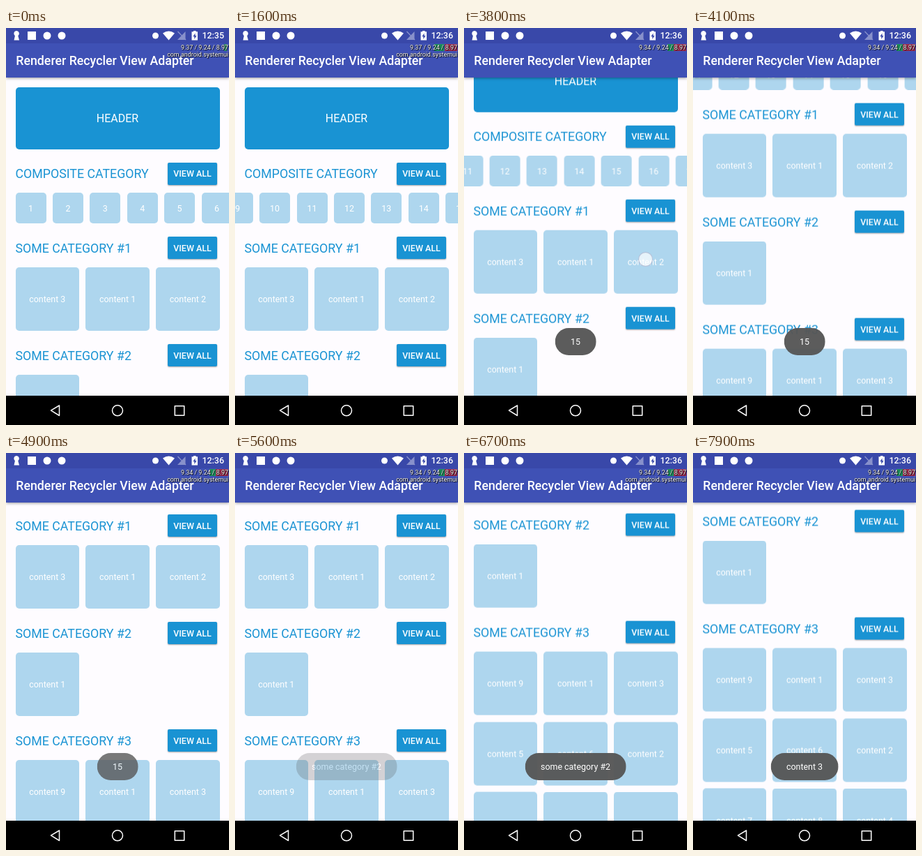
Recreate the animation shown at these times as an HTML page. Size 320 by 569 pixels, loop 8000 ms.

```html
<!DOCTYPE html>
<html lang="en">
<head>
<meta charset="utf-8">
<title>Renderer Recycler View Adapter</title>
<style>
  html, body { margin: 0; width: 100%; height: 100%; overflow: hidden; background: #fefcff; }
  body { position: relative; font: 12.44px Roboto, sans-serif; color: #fff; }
  #stage { position: absolute; left: 0; top: 0; width: 320px; height: 569px; overflow: hidden; }
  #stage div { position: absolute; white-space: nowrap; }
  #stage svg { position: absolute; left: 0; }

  .box { display: flex; align-items: center; justify-content: center; border-radius: 5px; }
  .header { left: 13.5px; top: 85px; width: 293px; height: 88.5px; background: #1993d3; font-size: 16px; }
  .title { left: 13.5px; line-height: 24px; font-size: 17.78px; color: #1993d3; }
  .button { left: 232px; width: 71px; height: 32px; border-radius: 2px; background: #1993d3;
    font-weight: 500; box-shadow: 0 1px 2px rgba(0, 0, 0, .35); }
  .tile { width: 91.5px; height: 91.5px; background: #aed6ee; }
  .chip { top: 236px; width: 44px; height: 44px; background: #aed6ee; }

  #bar { left: 0; top: 0; width: 320px; height: 71px; background: #3f51b5; box-shadow: 0 1px 4px rgba(0, 0, 0, .4); }
  #status { left: 0; top: 0; width: 320px; height: 21.5px; background: #3948a9; }
  #name { left: 14.3px; top: 35px; line-height: 24px; font-size: 17.78px; font-weight: 500; }
  .clock { right: 7px; top: 3px; line-height: 16px; font-weight: 500; }
  .load { right: 1px; font-size: 8.89px; line-height: 11px; text-shadow: 1px 1px 1px #000, 0 0 1px #000; }
  .meter { top: 23px; height: 10px; }
  #nav { left: 0; top: 526.5px; width: 320px; height: 42.5px; background: #000; }

  .toast { left: 160px; top: 430px; height: 39px; padding: 0 22.3px; border-radius: 20px;
    background: rgba(86, 86, 86, .96); line-height: 40px; transform: translateX(-50%); opacity: 0; }
  #touch { left: -10.5px; top: -10.5px; width: 19px; height: 19px; border: 1px solid rgba(130, 135, 175, .5);
    border-radius: 50%; background: rgba(255, 255, 255, .7); opacity: 0; }

  /* 1% = 80 ms */
  #list { animation: scroll 8s linear infinite; }
  @keyframes scroll {
    0%, 45% { transform: translateY(0); animation-timing-function: cubic-bezier(.33, 0, .67, .33); }
    47.5% { transform: translateY(-52.5px); animation-timing-function: cubic-bezier(.333, 1, .667, 1); }
    55%, 77.5% { transform: translateY(-211px); animation-timing-function: ease-in; }
    78.75% { transform: translateY(-231.5px); animation-timing-function: cubic-bezier(.333, 1, .667, 1); }
    86.25%, 100% { transform: translateY(-371.5px); }
  }
  #chips { animation: slide 8s linear infinite; }
  @keyframes slide {
    0%, 13.75% { transform: translateX(0); animation-timing-function: ease-in; }
    16.25% { transform: translateX(-130px); animation-timing-function: cubic-bezier(.333, 1, .667, 1); }
    26.25%, 100% { transform: translateX(-564.4px); }
  }
  #touch { animation: move 8s linear infinite, tap 8s step-end infinite; }
  @keyframes move {
    0%, 13.75% { transform: translate(262px, 258px); animation-timing-function: ease-in; }
    16.25%, 17.4% { transform: translate(125px, 258px); animation-timing-function: step-end; }
    32.5%, 36% { transform: translate(218px, 258px); animation-timing-function: step-end; }
    44.9%, 45% { transform: translate(258px, 384px); animation-timing-function: ease-in; }
    47.5% { transform: translate(260px, 331.5px); }
    48.75% { transform: translate(262px, 285px); animation-timing-function: step-end; }
    65%, 68% { transform: translate(267px, 258px); animation-timing-function: step-end; }
    77%, 77.5% { transform: translate(270px, 338px); animation-timing-function: ease-in; }
    78.75% { transform: translate(271px, 317.5px); }
    80% { transform: translate(272px, 275px); animation-timing-function: step-end; }
    91.25%, 100% { transform: translate(261px, 326px); }
  }
  @keyframes tap {
    0%, 16.3%, 35%, 48.8%, 67.5%, 80%, 93.75%, 100% { opacity: 0; }
    13.75%, 32.5%, 45%, 65%, 77.5%, 91.25% { opacity: 1; }
  }
  #toast1 { animation: toast1 8s linear infinite; }
  @keyframes toast1 {
    0%, 35% { opacity: 0; }
    40%, 60% { opacity: 1; }
    61.25% { opacity: .82; }
    65%, 100% { opacity: 0; }
  }
  #toast2 { animation: toast2 8s linear infinite; }
  @keyframes toast2 {
    0%, 68.75% { opacity: 0; }
    73.75%, 92% { opacity: 1; }
    95%, 100% { opacity: 0; }
  }
  #toast3 { animation: toast3 8s linear infinite; }
  @keyframes toast3 {
    0%, 94% { opacity: 0; }
    98.75%, 100% { opacity: 1; }
  }
  .a0 { animation: until900 8s step-end infinite; }
  .a1 { animation: from900 8s step-end infinite; }
  .b0 { animation: until2600 8s step-end infinite; }
  .b1 { animation: from2600 8s step-end infinite; }
  .gap { animation: gap 8s step-end infinite; }
  @keyframes until900 { 0% { opacity: 1; } 11.25%, 100% { opacity: 0; } }
  @keyframes from900 { 0% { opacity: 0; } 11.25%, 100% { opacity: 1; } }
  @keyframes until2600 { 0% { opacity: 1; } 32.5%, 100% { opacity: 0; } }
  @keyframes from2600 { 0% { opacity: 0; } 32.5%, 100% { opacity: 1; } }
  @keyframes gap { 0%, 58.75%, 100% { opacity: 1; } 32.5% { opacity: 0; } }
</style>
</head>
<body>
<div id="stage">
  <div id="list">
    <div class="box header">HEADER</div>
    <div id="chips"></div>
  </div>

  <div class="toast" id="toast1">15</div>
  <div class="toast" id="toast2">some category #2</div>
  <div class="toast" id="toast3">content 3</div>

  <div id="bar">
    <div id="status"></div>
    <svg width="320" height="22" fill="#fff" style="top:0">
      <path d="M15 4a4 4 0 0 1 2.3 7.2L19 17.500H11.500L12.900 11.200A4 4 0 0 1 15 4z"/>
      <rect x="31" y="5" width="12" height="12"/>
      <circle cx="59" cy="11" r="5.5"/>
      <circle cx="80" cy="11" r="5.500"/>
      <circle cx="214.500" cy="11" r="4.500"/>
      <path d="M225 7.500Q233.500 1.500 242 7.500L233.500 17.500z"/>
      <g opacity=".4"><path d="M257.500 5V17H246z"/><path d="M246.500 5L258 17" stroke="#fff" stroke-width="1.300"/></g>
      <path fill-rule="evenodd" d="M269 4h3.500v1.300h2.500V17.500h-8.500V5.300H269zM271.500 7.500L268.300 12.300h2v3.700l3.200-5h-2z"/>
    </svg>
    <div class="clock a0">12:35</div>
    <div class="clock a1">12:36</div>
    <div id="name">Renderer Recycler View Adapter</div>
    <div class="meter a0" style="left:313px;width:4px;background:#2b8f62"></div>
    <div class="a1">
      <div class="meter b0" style="left:286px;width:14px;background:#1d8f5c"></div>
      <div class="meter b1" style="left:292px;width:10px;background:#1d8f5c"></div>
      <div class="meter" style="left:301px;width:18px;background:#9c2b4c"></div>
    </div>
    <div class="load b0" style="top:22.500px">9.37 / 9.24 / 8.97</div>
    <div class="load b1" style="top:22.500px">9.34 / 9.24 / 8.97</div>
    <div class="load gap" style="top:33px">com.android.systemui</div>
  </div>

  <div id="nav">
    <svg width="320" height="42" style="top:0" fill="none" stroke="#fff" stroke-width="1.500" stroke-linejoin="round">
      <path d="M76.500 14V28.500L64.500 21.200z"/>
      <circle cx="160" cy="21.300" r="7.500"/>
      <rect x="242.300" y="14.800" width="13.400" height="13.400"/>
    </svg>
  </div>
  <div id="touch"></div>
</div>
<script>
  const list = document.getElementById('list');
  const chips = document.getElementById('chips');

  function add(parent, cls, text, style) {
    const el = document.createElement('div');
    el.className = cls;
    el.textContent = text;
    for (const key in style) el.style[key] = style[key] + 'px';
    parent.append(el);
  }

  function section(y, title, items = []) {
    add(list, 'title', title, { top: y - 12 });
    add(list, 'box button', 'VIEW ALL', { top: y - 16.5 });
    items.forEach((n, i) => add(list, 'box tile', 'content ' + n, {
      left: 13.5 + i % 3 * 100.8,
      top: y + 27.3 + Math.floor(i / 3) * 100.8
    }));
  }

  section(209, 'COMPOSITE CATEGORY');
  section(315.5, 'SOME CATEGORY #1', [3, 1, 2]);
  section(469.5, 'SOME CATEGORY #2', [1]);
  section(623.5, 'SOME CATEGORY #3', [9, 1, 3, 5, 6, 2, 7, 8, 4]);

  for (let n = 1; n <= 20; n++) add(chips, 'box chip', n, { left: 13.5 + (n - 1) * 53.4 });
</script>
</body>
</html>
```
